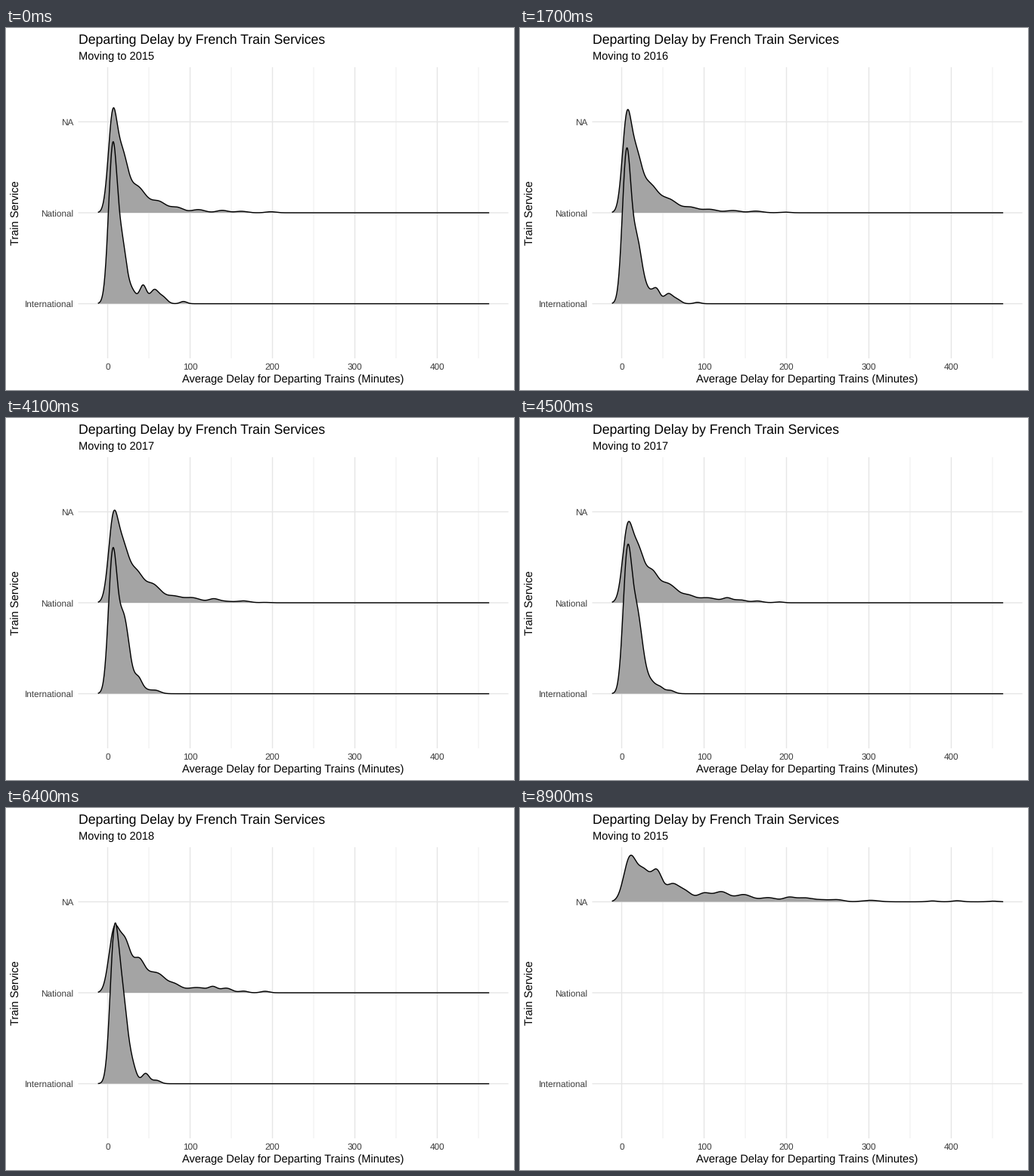
Animation, 672 px wide and 480 px high, one loop 10 s. Source, as a matplotlib script:

```python
import numpy as np
import matplotlib.pyplot as plt
from matplotlib.animation import FuncAnimation

W, H, DPI = 672, 480, 96
plt.rcParams["font.family"] = "Liberation Sans"
plt.rcParams["text.hinting"] = "none"

X0, SCALE = 134.5, 1.09            # pixel of 0 minutes, pixels per minute
ROWS = {"NA": 124.4, "National": 245.0, "International": 365.6}
LEFT, RIGHT, TOP, BOTTOM = 95.5, 664.6, 52, 438
GRID, FILL, TICK = "#e6e6e6", "#a4a4a4", "#3c3c3c"
LINE = 1.42 * 72 / DPI
DELAY = np.linspace(-11.8, 463, 900)
XS = X0 + SCALE * DELAY


def density(*lobes):
    """Sum of normal lobes, each (height in pixels, delay, spread)."""
    return sum(h * np.exp(-((DELAY - c) / s) ** 2 / 2) for h, c, s in lobes)


national = [
    density((122, 6, 5.4), (66, 17.5, 6.5), (35, 35, 11), (14, 62, 9),
            (7, 84, 8), (4.2, 110, 8), (3.2, 139, 7), (2, 162, 7),
            (1.4, 198, 6)),
    density((115, 6.6, 5.8), (62, 17.5, 6.5), (42, 32, 9), (23, 54, 9),
            (7.5, 80, 10), (6.5, 102, 9), (4.5, 130, 7), (2.7, 164, 9)),
    density((77, 7.5, 6.3), (64, 21, 7), (41, 38, 7), (17, 52, 7),
            (19, 63.5, 7.5), (11, 80, 8), (7, 108, 13), (6, 128, 5),
            (6, 144, 7), (2.2, 165, 5), (2, 191, 5)),
]
international = [
    density((205, 6.2, 5.2), (75, 17.5, 5.5), (15, 30, 5), (24, 43, 4.2),
            (18, 56.5, 5), (8.5, 67, 5), (3, 92, 4)),
    density((184, 5.5, 5.1), (98, 20, 6.8), (24, 37.5, 4.5), (5, 56, 7)),
    density((182, 7.9, 5.2), (108, 18, 6), (20, 30, 5), (13.5, 46, 4.5),
            (4.5, 59, 5)),
]
unnamed = density(
    (57, 10, 7.5), (39, 27, 8), (36, 43, 6.3), (22, 61, 8), (13, 77, 8),
    (11, 100, 8), (13, 121, 9), (9.5, 148, 10), (5.5, 178, 10), (5.5, 203, 7),
    (5, 221, 9), (2.6, 242, 10), (2.6, 262, 8), (2, 302, 10), (1.2, 377, 6),
    (1.5, 407, 6), (0.9, 451, 6))

fig = plt.figure(figsize=(W / DPI, H / DPI), dpi=DPI, facecolor="white")
ax = fig.add_axes([0, 0, 1, 1])
ax.set_xlim(0, W)
ax.set_ylim(H, 0)
ax.axis("off")


def label(x, y, text, size, color="black", **kw):
    return ax.text(x, y, text, fontsize=size, color=color, va="baseline", **kw)


def rule(x, y, width=LINE):
    ax.plot(x, y, color=GRID, lw=width, solid_capstyle="butt", snap=False,
            zorder=1)


for minutes in range(0, 500, 100):
    x = X0 + SCALE * minutes
    minor = x + SCALE * 50
    rule([minor, minor], [TOP, BOTTOM], LINE / 2)
    rule([x, x], [TOP, BOTTOM])
    label(x, 453, str(minutes), 8.8, TICK, ha="center")
for name, y in ROWS.items():
    rule([LEFT, RIGHT], [y, y])
    label(89.2, y + 4.4, name, 8.8, TICK, ha="right")

label(95.5, 20, "Departing Delay by French Train Services", 13.2)
subtitle = label(95.5, 42, "", 11)
label(380, 470, "Average Delay for Departing Trains (Minutes)", 11, ha="center")
label(18, 245, "Train Service", 11, ha="center", rotation=90,
      rotation_mode="anchor")


class Ridge:
    def __init__(self, row, z):
        self.base = ROWS[row]
        self.area, = ax.fill([0], [0], color=FILL, lw=0, zorder=z)
        self.line, = ax.plot([], [], color="black", lw=LINE, zorder=z + 0.5,
                             solid_capstyle="butt")

    def show(self, height):
        shown = height is not None
        self.area.set_visible(shown)
        self.line.set_visible(shown)
        if shown:
            y = self.base - height
            self.line.set_data(XS, y)
            self.area.set_xy(np.vstack([np.column_stack([XS, y]),
                                        (XS[-1], self.base),
                                        (XS[0], self.base)]))


ridges = [Ridge(row, 2 + i) for i, row in enumerate(ROWS)]


def blend(curves, pos):
    i = min(int(pos), 1)
    return curves[i] + (curves[i + 1] - curves[i]) * (pos - i)


def update(frame):
    if frame < 13 or frame >= 89:
        year = 2015
    else:
        year = 2016 + (frame >= 39) + (frame >= 64)
    subtitle.set_text(f"Moving to {year}")
    if frame < 75:
        pos = np.interp(frame, [12, 25, 38, 50], [0, 1, 1, 2])
        heights = None, blend(national, pos), blend(international, pos)
    else:
        heights = unnamed, None, None
    for ridge, height in zip(ridges, heights):
        ridge.show(height)
    return []


anim = FuncAnimation(fig, update, frames=100, interval=100, repeat=True,
                     repeat_delay=0, init_func=lambda: update(0))
plt.show()
```
